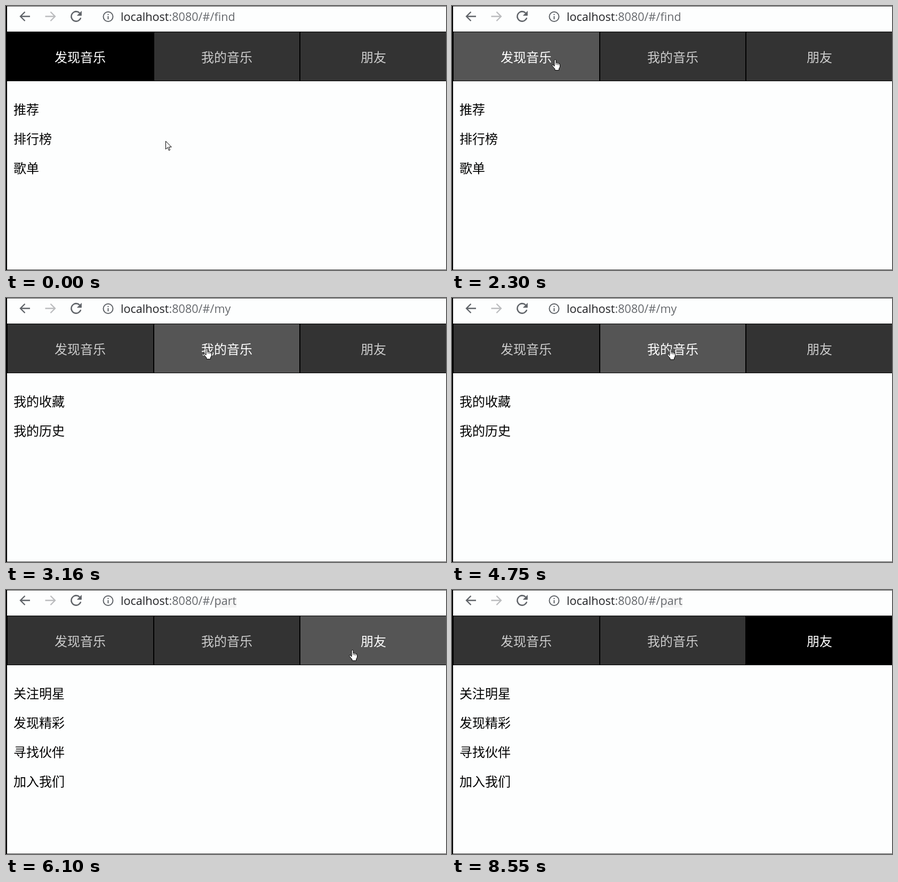
Write an HTML page with a canvas that moves like this. It is 825 by 495 pixels and loops after 8.96 s.

```html
<!DOCTYPE html>
<html lang="zh-CN">
<head>
<meta charset="utf-8">
<title>Tabs</title>
<style>
html, body { margin: 0; width: 100%; height: 100%; overflow: hidden; background: #fdfefe; }
canvas { display: block; }
</style>
</head>
<body>
<canvas id="stage" width="825" height="495"></canvas>
<script>
const ctx = document.getElementById('stage').getContext('2d');
const LOOP = 8960;
const CJK = '24px "Noto Sans CJK SC", "Noto Sans CJK", sans-serif';
const LATIN = '21.6px "Open Sans", "Noto Sans", sans-serif';

const tabs = [
  { label: '发现音乐', left: 3, right: 276, textX: 91 },
  { label: '我的音乐', left: 278, right: 550, textX: 366 },
  { label: '朋友', left: 552, right: 825, textX: 665 }
];
const pages = [
  { path: 'find', items: ['推荐', '排行榜', '歌单'] },
  { path: 'my', items: ['我的收藏', '我的历史'] },
  { path: 'part', items: ['关注明星', '发现精彩', '寻找伙伴', '加入我们'] }
];

// Each entry holds from its start time until the next one.
const pageSteps = [[0, 0], [3160, 1], [5980, 2]];
const pathSteps = [[0, 0], [3160, 1], [6100, 2]];
const pointerSteps = [
  [0, 'arrow', 299, 253],
  [890, 'arrow', 280, 241],
  [1040, 'arrow', 205, 156],
  [1160, 'hand', 151, 103],
  [1310, 'hand', 141, 79],
  [2150, 'hand', 135, 97],
  [2300, 'hand', 187, 100],
  [2450, 'hand', 290, 97],
  [2580, 'hand', 370, 94],
  [4750, 'hand', 403, 95],
  [4870, 'hand', 470, 99],
  [4990, 'hand', 570, 106],
  [5110, 'hand', 643, 112],
  [8160, 'arrow', 680, 235],
  [8280, 'arrow', 728, 392],
  [8430, 'arrow', 778, 476],
  [8550, 'none', 0, 0]
];

const at = (steps, t) => steps.findLast(step => step[0] <= t);

function rect(color, x, y, w, h) {
  ctx.fillStyle = color;
  ctx.fillRect(x, y, w, h);
}

function text(str, x, y, color, font) {
  ctx.font = font;
  ctx.fillStyle = color;
  ctx.fillText(str, x, y);
  return x + ctx.measureText(str).width;
}

function stroke(path, color, width) {
  ctx.strokeStyle = color;
  ctx.lineWidth = width;
  ctx.stroke(path);
}

const backIcon = new Path2D('M45 19.5H27M35.5 11L27 19.5L35.5 28');
const forwardIcon = new Path2D('M73.5 19.5H92M83.5 11L92 19.5L83.5 28');
const reloadHead = new Path2D('M141.9 18.2H132.8L141.9 9.1Z');
const reloadArc = new Path2D();
reloadArc.arc(131.5, 19.5, 9.1, 0.29, Math.PI * 1.75);
const infoRing = new Path2D();
infoRing.arc(191.5, 20, 9, 0, Math.PI * 2);

const arrowShape = new Path2D('M.5 .5V15.5L4 12.2L6.4 17.8L8.6 16.9L6.2 11.4H11.2Z');
const handShape = new Path2D(
  'M5 13V2Q5 .5 6.5 .5T8 2V6.5Q9.5 5.2 10.5 7Q12 5.8 13 7.8Q15.5 7 15.5 10' +
  'V14L13.5 18V20.5H6V18L.8 12Q.3 9.8 2.2 10Z');
const handCreases = new Path2D('M8 6.5V10M10.5 7V10.5M13 7.8V11');

function drawToolbar(path) {
  const grey = '#5f6368';
  stroke(backIcon, grey, 2.3);
  stroke(forwardIcon, '#bbbcbe', 2.3);
  stroke(reloadArc, grey, 2.5);
  ctx.fillStyle = grey;
  ctx.fill(reloadHead);
  stroke(infoRing, grey, 2);
  rect(grey, 190.5, 15, 2, 2);
  rect(grey, 190.5, 19, 2, 6);
  if (path === 'part') rect('#f4f4f4', 391, 14, 41, 19);
  const end = text('localhost', 215, 28, '#202124', LATIN);
  text(':8080/#/' + path, end, 28, '#66696d', LATIN);
}

function drawTabs(active, hovered) {
  rect('#000', 0, 48, 825, 93);
  tabs.forEach((tab, i) => {
    const fill = i === hovered ? '#555' : i === active ? '#000' : '#333';
    rect(fill, tab.left, 49, tab.right - tab.left, 91);
    text(tab.label, tab.textX, 105, i === active ? '#fff' : '#ccc', CJK);
  });
}

function drawPointer(kind, x, y) {
  if (kind === 'none') return;
  const shape = kind === 'hand' ? handShape : arrowShape;
  ctx.save();
  ctx.translate(x, y);
  ctx.fillStyle = '#fff';
  ctx.fill(shape);
  stroke(shape, '#000', 1);
  if (kind === 'hand') stroke(handCreases, '#000', 0.8);
  ctx.restore();
}

function draw(t) {
  const active = at(pageSteps, t)[1];
  const [, kind, x, y] = at(pointerSteps, t);
  const hovered = kind === 'hand'
    ? tabs.findIndex(tab => x + 6 >= tab.left && x + 6 < tab.right) : -1;

  rect('#fdfefe', 0, 0, 825, 495);
  drawToolbar(pages[at(pathSteps, t)[1]].path);
  drawTabs(active, hovered);
  pages[active].items.forEach((item, i) => text(item, 14, 203 + 55 * i, '#000', CJK));
  rect('#555', 0, 0, 825, 1);
  rect('#555', 0, 494, 825, 1);
  rect('#000', 0, 0, 2, 495);
  drawPointer(kind, x, y);
}

const start = performance.now();
function tick() {
  draw((performance.now() - start) % LOOP);
  requestAnimationFrame(tick);
}
tick();
</script>
</body>
</html>
```
